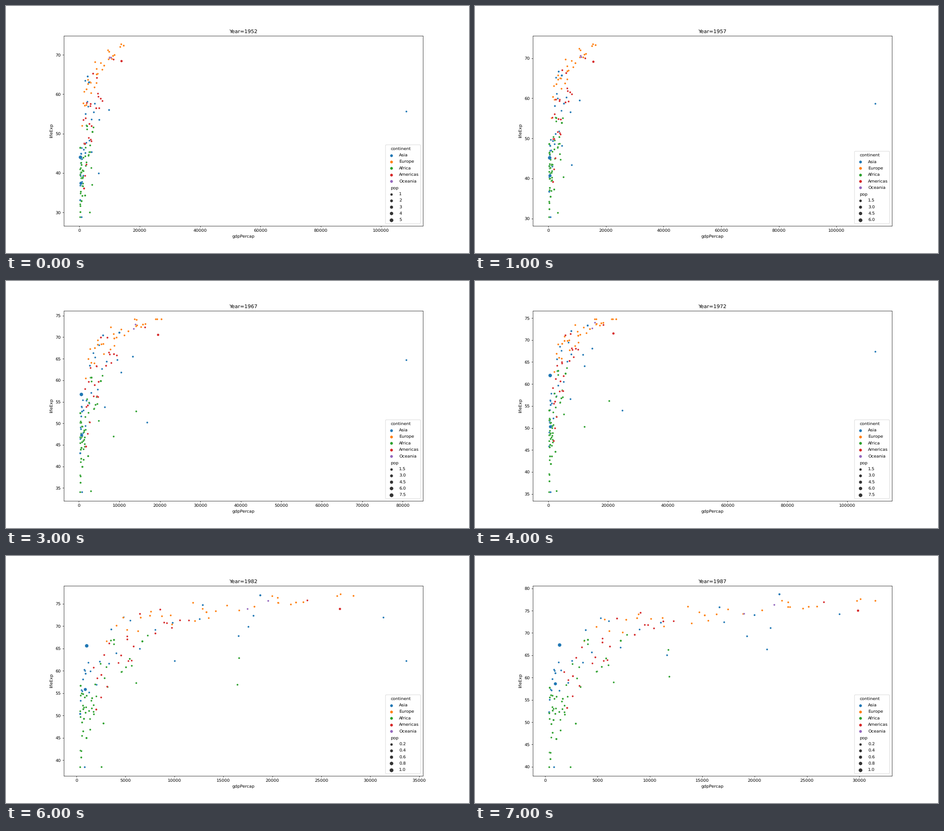
A matplotlib script that plays this animation: 1025 by 547 pixels, repeating every 8000 ms.

```python
import numpy as np
import matplotlib.pyplot as plt
from matplotlib.animation import FuncAnimation
from matplotlib.patches import FancyBboxPatch
from matplotlib.ticker import MaxNLocator

W, H, DPI = 1025, 547, 205 / 3
YEARS = range(1952, 1988, 5)
LAST = len(YEARS) - 1
LIFE_MIN = (28.8, 30.33, 32.0, 34.02, 35.4, 31.22, 38.45, 39.91)
LIFE_MAX = (72.67, 73.47, 73.68, 74.16, 74.72, 76.11, 77.11, 78.67)
POP_MAX = (5.56, 6.37, 6.66, 7.55, 8.62, 9.43, 1.0003, 1.084)

COLORS = {"Asia": "C0", "Europe": "C1", "Africa": "C2",
          "Americas": "C3", "Oceania": "C4"}

# Continent, count, skew, then (poorest, richest) gdp and life expectancy
# and the spread of life, each at the start and at the end.
CLOUDS = (
    ("Asia", 21, 1.1, (331, 4835), (385, 11055), (37, 55), (55, 72), (7, 5)),
    ("Asia", 5, 1.0, (2000, 9867), (17100, 20000), (62, 56), (71, 74), (4, 4)),
    ("Europe", 30, 0.6, (974, 14734), (3740, 31541), (54, 72), (69.5, 77), (3, 2)),
    ("Africa", 49, 1.25, (299, 4725), (390, 7826), (37, 46), (48, 64), (9, 9)),
    ("Americas", 23, 0.85, (1400, 7690), (1824, 12281), (45, 60), (57, 73.5), (10, 5)),
    ("Oceania", 2, 1.0, (10040, 10557), (21889, 19007), (69.2, 69.3), (76.3, 74.3), (0, 0)),
)

# Countries that stand apart: evenly timed key points of gdp and life expectancy.
TRACKS = {
    "Afghanistan": ("Asia", (779, 852), LIFE_MIN),
    "China": ("Asia", (400, 600, 720, 1379), (44, 46, 61, 64.3, 67.3)),
    "India": ("Asia", (547, 977), (37.4, 48.9, 58.6)),
    "Iraq": ("Asia", (4130, 11644), (45.3, 65)),
    "Japan": ("Asia", (3217, 12100, 22376), (63, 72.4, 78.67)),
    "Kuwait": ("Asia", (108382, 113523, 95458, 80895, 109348, 59265, 31354, 28118),
               (55.6, 66.2, 74.2)),
    "Saudi Arabia": ("Asia", (6460, 8158, 11626, 16903, 24838, 34168, 33693, 21198),
                     (39.9, 51.9, 66.3)),
    "Angola": ("Africa", (3521, 2430), (30, 39.9)),
    "Gabon": ("Africa", (4293, 6200, 9800, 21000, 11864), (37, 60.2)),
    "Libya": ("Africa", (2388, 6000, 20000, 21500, 11771), (42.7, 66.2)),
    "Canada": ("Americas", (11367, 26627), (68.8, 76.9)),
    "United States": ("Americas", (13990, 20700, 29884), (68.4, 70.9, 75)),
}
SHARE = {"China": 1, "India": 0.7, "United States": 0.25, "Japan": 0.13}

rng = np.random.default_rng(7)


def make_traits(count):
    """Fixed rank, life offset and gdp factor of each country in a cloud."""
    rank = np.linspace(0, 1, count)
    offset = rng.permutation(np.linspace(-1, 1, count))
    factor = np.exp(rng.uniform(-0.2, 0.2, count) * np.sin(np.pi * rank))
    return rank, 0.6 * offset + 0.4 * offset ** 3, factor


TRAITS = [make_traits(cloud[1]) for cloud in CLOUDS]


def mix(start, end, amount):
    return np.asarray(start) * (1 - amount) + np.asarray(end) * amount


def sample(values, step):
    return np.interp(step, np.linspace(0, LAST, len(values)), values)


def countries(step):
    """Return gdp and life expectancy of every country."""
    progress = step / LAST
    eased = progress * (1.4 - 0.4 * progress)
    gdp, life = [], []
    for cloud, (rank, offset, factor) in zip(CLOUDS, TRAITS):
        _, _, skew, gdp0, gdp1, life0, life1, spread = cloud
        wealth = rank ** skew
        gdp.extend(np.exp(mix(*mix(np.log(gdp0), np.log(gdp1), progress), wealth)) * factor)
        life.extend(mix(*mix(life0, life1, eased), wealth) + mix(*spread, progress) * offset)
    for _, gdps, lives in TRACKS.values():
        gdp.append(np.exp(sample(np.log(gdps), step)))
        life.append(sample(lives, step))
    return np.array(gdp), np.clip(life, LIFE_MIN[step], LIFE_MAX[step])


def marker_area(share):
    return 18 + 54 * np.asarray(share)


cloud_total = sum(cloud[1] for cloud in CLOUDS)
shares = np.append(np.minimum(rng.exponential(0.025, cloud_total), 0.15),
                   [SHARE.get(name, 0.02) for name in TRACKS])
colors = [COLORS[cloud[0]] for cloud in CLOUDS for _ in range(cloud[1])]
colors += [COLORS[track[0]] for track in TRACKS.values()]

plt.rcParams.update({"font.family": "DejaVu Sans", "text.hinting": "none"})
fig = plt.figure(figsize=((W + 0.01) / DPI, (H + 0.01) / DPI), dpi=DPI)
ax = fig.add_subplot()
ax.set(xlabel="gdpPercap", ylabel="lifeExp")
dots = ax.scatter(np.zeros(len(shares)), np.zeros(len(shares)), s=marker_area(shares),
                  c=colors, edgecolors="white", linewidths=0.34)
overlay = fig.add_axes((0, 0, 1, 1))


def legend_rows(top_pop):
    yield "continent", None, 0
    for name, color in COLORS.items():
        yield name, color, 36
    yield "pop", None, 0
    ticks = MaxNLocator(6).tick_values(0, top_pop)
    ticks = ticks[(ticks > 0) & (ticks <= top_pop)]
    digits = 0 if np.allclose(ticks, np.round(ticks)) else 1
    for value in ticks:
        yield f"{value:.{digits}f}", "0.2", marker_area(value / top_pop)


def draw_legend(step):
    overlay.clear()
    overlay.set(xlim=(0, W), ylim=(H, 0))
    overlay.axis("off")
    rows = list(legend_rows(POP_MAX[step]))
    pitch, last = 14.32, 476.3
    first = last - pitch * (len(rows) - 1)
    overlay.add_patch(FancyBboxPatch(
        (842, first - 9.5), 73.8, last - first + 13.4,
        boxstyle="round,pad=1.9,rounding_size=1.9",
        fc="white", ec="0.8", alpha=0.8, lw=1))
    for i, (label, color, area) in enumerate(rows):
        y = first + pitch * i
        overlay.text(870.2 if color else 851, y, label, fontsize=10)
        if color:
            overlay.scatter([853.1], [y - 2.5], s=area, color=color, linewidths=0.34)


def with_margin(low, high):
    pad = 0.05 * (high - low)
    return low - pad, high + pad


def draw(step):
    gdp, life = countries(step)
    dots.set_offsets(np.column_stack((gdp, life)))
    ax.set_xlim(with_margin(gdp.min(), gdp.max()))
    ax.set_ylim(with_margin(LIFE_MIN[step], LIFE_MAX[step]))
    ax.set_title(f"Year={YEARS[step]}")
    draw_legend(step)
    return ()


anim = FuncAnimation(fig, draw, frames=len(YEARS), interval=1000,
                     init_func=lambda: draw(0), repeat=True, repeat_delay=0, blit=False)
plt.show()
```
